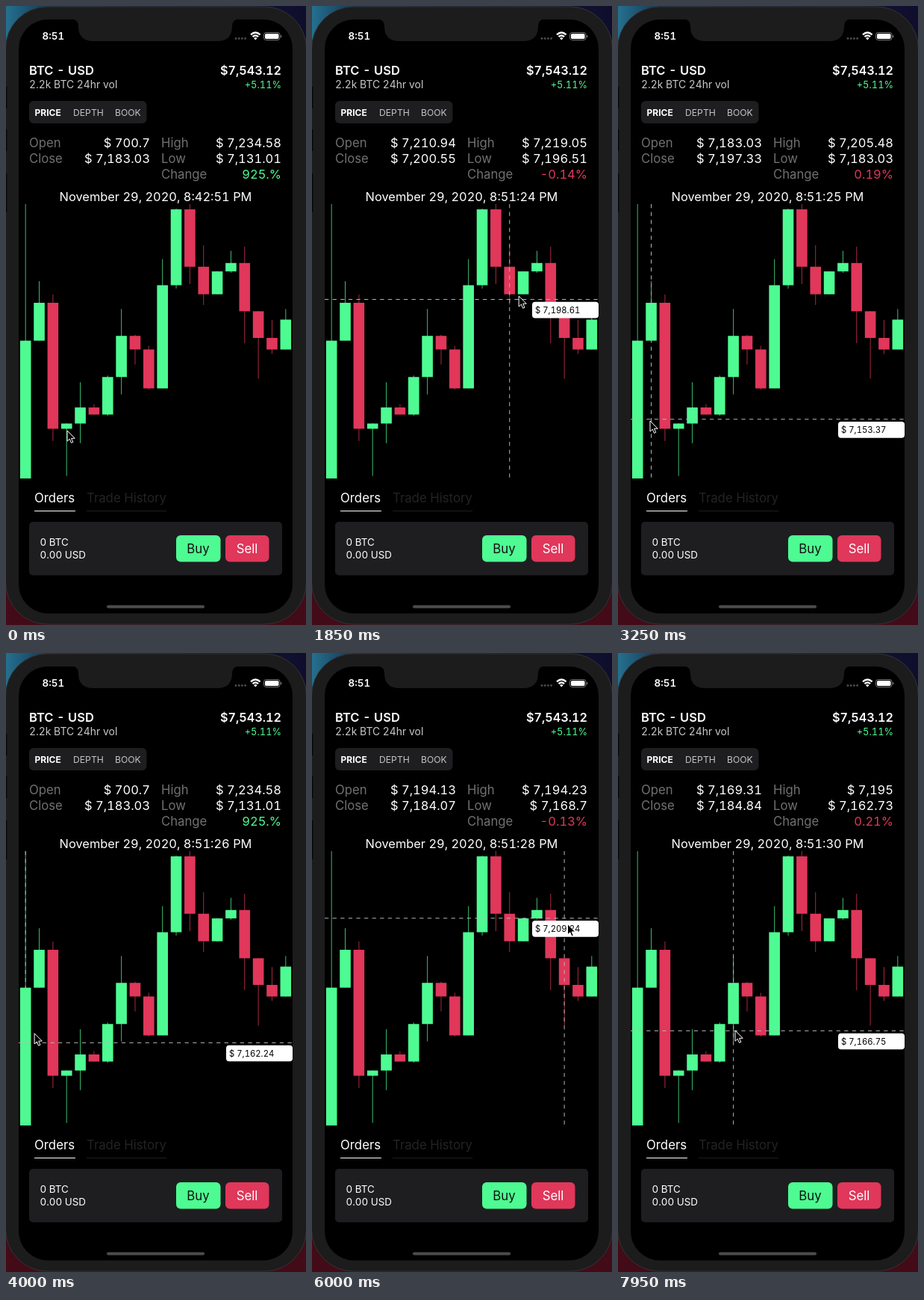
Recreate the animation shown at these times as an HTML page. Size 402x828 px, loop 8000 ms.

```html
<!DOCTYPE html>
<html lang="en">
<head>
<meta charset="utf-8">
<title>Candlestick chart</title>
<style>
  html, body { margin: 0; width: 100%; height: 100%; overflow: hidden; background: #000; }
  svg { display: block; width: 100vw; height: 100vh; }
  text { font-family: Inter, Roboto, sans-serif; font-variant-numeric: tabular-nums; white-space: pre; }
</style>
</head>
<body>
<svg id="stage" viewBox="0 0 402 828"></svg>
<script>
const GREEN = '#4efb92', RED = '#e0375a', GREY = '#707072', PANEL = '#1e1e21', WHITE = '#fff';
const LOOP = 8000, PRESS = 600, LAG = 40;
const chart = { left: 17, right: 384, top: 265, bottom: 632, high: 7234.58, low: 7131.01 };

// Each candle opens where the one before it closed
const closes = [
  700.7, 7183.03, 7197.33, 7149.78, 7151.75, 7157.82, 7155.14, 7169.31, 7184.84, 7179.71, 7165.01,
  7203.96, 7232.6, 7210.94, 7200.55, 7209.18, 7212.35, 7194.13, 7184.07, 7179.69, 7190.98
];
const count = closes.length - 1;
const step = (chart.right - chart.left) / count;
const wave = (i, peak, period) => Math.cos((i - peak) * 2 * Math.PI / period);
const pulse = (i, peak, period) => ((1 + wave(i, peak, period)) / 2) ** 2;

// Wick lengths rise and fall along the chart
const candles = closes.slice(1).map((close, i) => {
  const open = closes[i], body = Math.abs(close - open);
  const above = 10 * pulse(i, 1.3, 2.85) + body * 0.01;
  const below = (11 + 7 * wave(i, 3, 14)) * pulse(i, 3.1, 4.5);
  return {
    open, close,
    high: Math.min(chart.high, Math.max(open, close) + above),
    low: Math.max(chart.low, Math.min(open, close) - below),
    color: close >= open ? GREEN : RED
  };
});

// Pointer key points: time, x, y
const path = [
  [PRESS, 82, 568], [1850, 277, 388], [2150, 312, 362], [2650, 176, 458],
  [3300, 40, 556], [3880, 28, 545], [4000, 38, 509], [5100, 183, 333],
  [5650, 300, 318], [6200, 352, 400], [6800, 311, 503], [7400, 232, 530], [7950, 157, 505]
];

const stage = document.getElementById('stage');
const perPixel = (chart.high - chart.low) / (chart.bottom - chart.top);
const priceY = p => Math.min(chart.bottom, chart.top + (chart.high - p) / perPixel);
const priceAt = y => chart.high - (y - chart.top) * perPixel;
const centerX = i => chart.left + step * (i + 0.5);
const dollars = n => '$ ' + n.toLocaleString('en-US', { maximumFractionDigits: 2 });

const rect = (x, y, w, h, fill, r = 0) =>
  `<rect x="${x}" y="${y}" width="${w}" height="${h}" rx="${r}" fill="${fill}"/>`;
const text = (x, y, size, str, fill = WHITE, extra = '') =>
  `<text x="${x}" y="${y}" font-size="${size}" fill="${fill}" ${extra}>${str}</text>`;
const END = 'text-anchor="end" ', MID = 'text-anchor="middle" ', BOLD = 'font-weight="600" ';
const rowY = row => 188.5 + row * 21.2;

function phone() {
  const dots = [0, 1, 2, 3].map(i => `<circle cx="${308 + i * 4.2}" cy="43.5" r="1.4" fill="#4c4c4e"/>`);
  return `<linearGradient id="sky"><stop stop-color="#25708f"/><stop offset=".15" stop-color="#14324f"/>
      <stop offset="1" stop-color="#0f0d2c"/></linearGradient>`
    + rect(0, 0, 402, 414, 'url(#sky)') + rect(0, 414, 402, 414, '#420b17')
    + '<rect x="-.5" y="1" width="403" height="826" rx="56" fill="#1c1c1c" stroke="#333335"/>'
    + rect(0, 108, 1.3, 29, '#050505') + rect(0, 165, 1.3, 29, '#050505') + rect(0, 224, 1.3, 52, '#050505')
    + rect(17, 18, 367, 794.5, '#000', 39)
    + '<path d="M88 17.5Q97 18 97 27Q97 47 117 47H283Q303 47 303 27Q303 18 312 17.5Z" fill="#1c1c1c"/>'
    + text(48.5, 45, 13.4, '8:51', WHITE, BOLD) + dots.join('')
    + `<path d="M328 38.4Q334.3 32.7 340.6 38.4M330.5 41.2Q334.3 37.8 338.1 41.2"
        fill="none" stroke="#fff" stroke-width="2.3"/>
      <path d="M332 43Q334.3 41.2 336.6 43L334.3 45.4Z" fill="#fff"/>
      <rect x="345.5" y="35.5" width="21.5" height="10" rx="3" fill="none" stroke="#777"/>`
    + rect(347, 37, 18.5, 7, WHITE, 1.7) + rect(368, 39, 1.3, 3.2, '#777', 0.6);
}

function header() {
  const label = (x, row, str) => text(x, rowY(row), 16.7, str, GREY);
  return text(31, 92, 16.5, 'BTC - USD', WHITE, BOLD)
    + text(369, 92, 16.2, '$7,543.12', WHITE, END + BOLD)
    + text(31, 110, 13.9, '2.2k BTC 24hr vol', '#c8c8ca')
    + text(369, 110, 12.8, '+5.11%', GREEN, END)
    + rect(31, 127, 157.5, 30, PANEL, 6)
    + text(38.5, 146.7, 12, 'PRICE', WHITE, 'font-weight="700"')
    + text(90, 146.7, 12.2, 'DEPTH', '#c4c4c6')
    + text(146, 146.7, 12.2, 'BOOK', '#c4c4c6')
    + label(31, 0, 'Open') + label(31, 1, 'Close')
    + label(208, 0, 'High') + label(208, 1, 'Low') + label(208, 2, 'Change');
}

function chartBody() {
  return candles.map(({ open, high, low, close, color }, i) => {
    const x = centerX(i);
    const top = priceY(Math.max(open, close)), bottom = priceY(Math.min(open, close));
    return `<path d="M${x} ${priceY(high)}V${priceY(low)}" stroke="${color}" opacity=".75"/>`
      + rect(x - 7.3, top, 14.6, bottom - top, color);
  }).join('');
}

function footer() {
  return text(38, 664, 16.8, 'Orders') + rect(38, 675, 55, 1, WHITE)
    + text(108, 664, 16.8, 'Trade History', '#232325') + rect(108, 675, 107, 1, PANEL)
    + rect(31, 690, 339, 71.5, PANEL, 5)
    + text(45.5, 722, 13.4, '0 BTC') + text(45.5, 739, 13.4, '0.00 USD')
    + rect(228, 708, 59.5, 35.5, GREEN, 6) + text(257.5, 732, 16.8, 'Buy', '#111', MID)
    + rect(294, 708, 58.5, 35.5, RED, 6) + text(323, 732, 16.8, 'Sell', WHITE, MID)
    + rect(135, 801.5, 131, 4, '#4c4c4e', 2);
}

stage.innerHTML = phone() + header() + chartBody() + footer() + '<g id="live"></g>';
const live = document.getElementById('live');

// Monotone cubic interpolation of one coordinate of the pointer path
function track(axis, t) {
  const last = path.length - 1;
  if (t <= path[0][0]) return path[0][axis];
  if (t >= path[last][0]) return path[last][axis];
  const i = path.findIndex(k => k[0] > t) - 1;
  const slope = j => (path[j + 1][axis] - path[j][axis]) / (path[j + 1][0] - path[j][0]);
  const tangent = j => {
    if (j === 0 || j === last) return 0;
    const a = slope(j - 1), b = slope(j);
    return a * b <= 0 ? 0 : 2 * a * b / (a + b);
  };
  const span = path[i + 1][0] - path[i][0], u = (t - path[i][0]) / span, v = 1 - u;
  return path[i][axis] * v * v * (1 + 2 * u) + path[i + 1][axis] * u * u * (3 - 2 * u)
    + span * u * v * (tangent(i) * v - tangent(i + 1) * u);
}
const pointer = t => ({ x: track(1, t), y: track(2, t) });

function selected(t) {
  if (t < PRESS) return 0;
  const i = Math.floor((pointer(t - LAG).x - chart.left) / step);
  return Math.max(0, Math.min(count - 1, i));
}

// The change keeps the colour of the candle selected before
function changeColor(t) {
  const now = selected(t);
  while (t > 0 && selected(t) === now) t -= 10;
  return candles[selected(t)].color;
}

function crosshair(x, y) {
  return `<path d="M${chart.left} ${y}H${chart.right}M${x} ${chart.top}V${chart.bottom}"
      fill="none" stroke="#b5b6b7" stroke-dasharray="5.3"/>`
    + rect(295, y + 3.3, 89, 21.7, WHITE, 4)
    + text(299, y + 18.3, 11.3, dollars(priceAt(y)), '#000');
}

function draw(t) {
  const index = selected(t), { open, high, low, close } = candles[index];
  const change = (close - open) / open * 100;
  const time = t < PRESS ? '8:42:51' : '8:51:' + (22 + Math.floor((t + 600) / 1000));
  const value = (x, row, str, fill) => text(x, rowY(row), 16.5, str, fill, END);
  const { x, y } = pointer(t);
  live.innerHTML = value(193, 0, dollars(open)) + value(193, 1, dollars(close))
    + value(369, 0, dollars(high)) + value(369, 1, dollars(low))
    + value(369, 2, change.toFixed(5).slice(0, change < 0 ? 5 : 4) + '%', changeColor(t))
    + text(200.5, 261, 16.4, `November 29, 2020, ${time} PM`, WHITE, MID)
    + (t < PRESS ? '' : crosshair(centerX(index), pointer(t - LAG).y))
    + `<path transform="translate(${x} ${y})" fill="#000" stroke="#fff"
        d="M0 0V14.2L3.3 11.2L5.5 16.4L7.8 15.4L5.6 10.3H10.2Z"/>`;
}

function frame(now) {
  draw(now % LOOP);
  requestAnimationFrame(frame);
}
draw(0);
requestAnimationFrame(frame);
</script>
</body>
</html>
```
